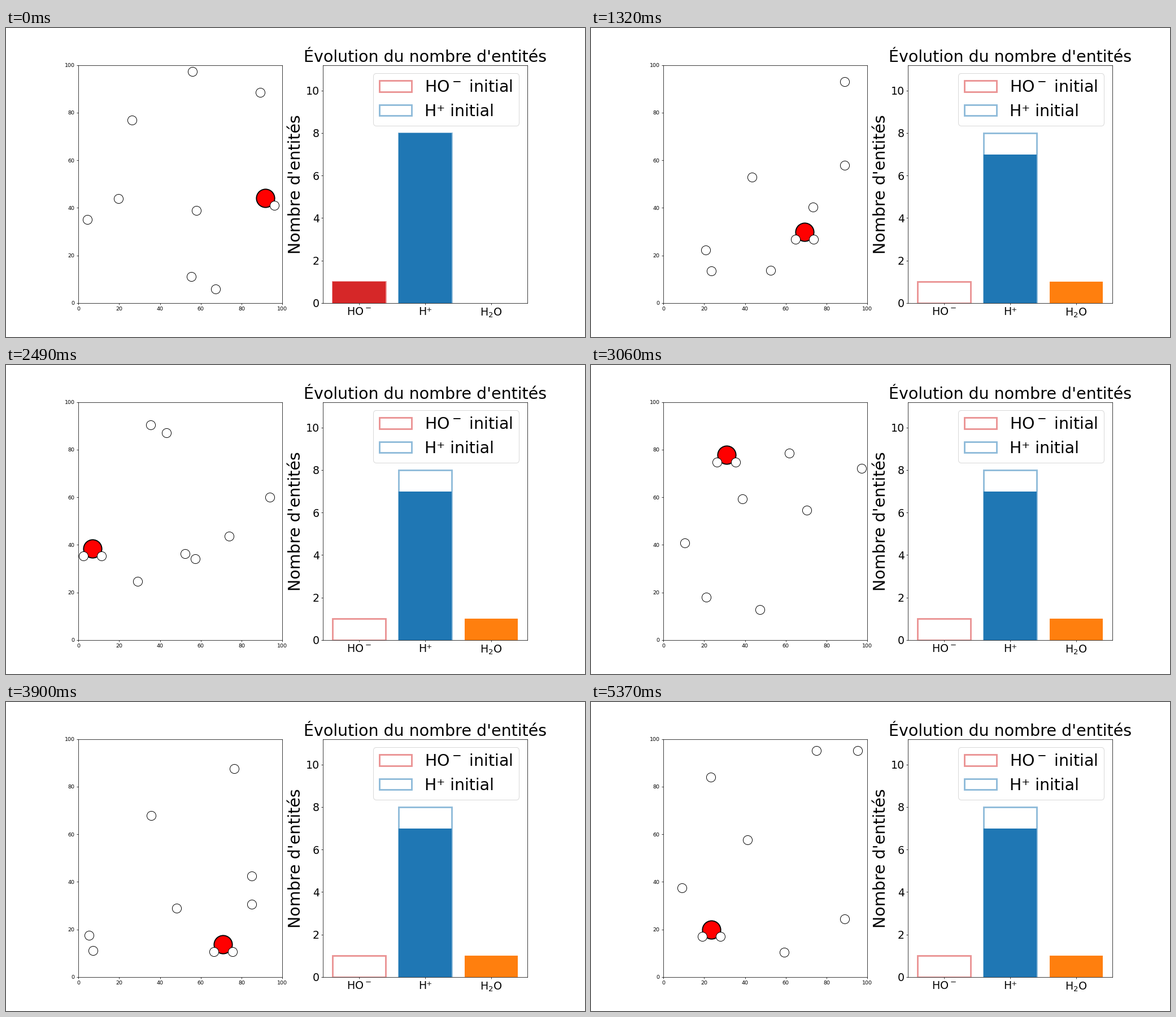
Write a matplotlib script that moves like this. It is 1025x547 px and loops after 5.4 s.

```python
import itertools

import numpy as np
import matplotlib.pyplot as plt
from matplotlib.animation import FuncAnimation

plt.rcParams["font.family"] = "DejaVu Sans"

W, H, DPI = 1025, 547, 1025 / 15
STEPS, CYCLES, INTERVAL = 90, 2, 30
SPEED = 4          # axis units per step
REACTION = 8       # step at which the water molecule forms
KEY_STEPS = [0, 12, 26, 40, 62, 89]
BOND = np.array([4.5, -3])

# Way-points of the free protons, the reacting proton and the oxygen atom.
PROTONS = [
    [(56.0, 97.4), (97.3, 72.1), (49.7, 43.2), (7.2, 11.0), (96.2, 25.2), (9.0, 37.5)],
    [(89.2, 88.4), (61.7, 78.5), (18.2, 45.5), (85.0, 30.5), (21.0, 84.4), (88.9, 24.5)],
    [(55.3, 11.1), (38.6, 59.3), (86.9, 40.1), (35.6, 67.8), (78.1, 18.6), (23.1, 84.0)],
    [(67.4, 5.8), (70.4, 54.5), (26.4, 50.1), (85.0, 42.5), (89.0, 67.6), (95.1, 95.1)],
    [(57.8, 38.9), (10.4, 40.8), (82.1, 71.7), (48.2, 29.0), (72.3, 59.4), (74.9, 95.1)],
    [(19.6, 44.0), (21.0, 18.0), (61.6, 46.5), (76.3, 87.6), (49.7, 77.2), (59.3, 10.3)],
    [(4.4, 35.2), (47.2, 12.8), (52.7, 61.1), (5.1, 17.5), (91.2, 43.4), (41.1, 57.7)],
]
REACTANT_START = np.array([26.2, 77.0])
OXYGEN = [(91.5, 44.1), (30.9, 77.8), (41.0, 61.6), (71.0, 13.7), (61.4, 87.2), (23.5, 20.0)]


class BouncingPath:
    """Straight runs between way-points, reflected by the walls."""

    def __init__(self, points, margin):
        self.low, self.span = margin, 100 - 2 * margin
        self.points = np.array(points)
        self.moves = [self.best_move(i) for i in range(len(points) - 1)]

    def best_move(self, i):
        start, end = self.points[i:i + 2]
        length = SPEED * (KEY_STEPS[i + 1] - KEY_STEPS[i])
        moves = [self.mirror(end, np.array(k)) - start
                 for k in itertools.product((0, -1, 1), repeat=2)]
        return min(moves, key=lambda move: abs(np.hypot(*move) - length))

    def mirror(self, point, k):
        r = point - self.low
        return self.low + np.where(k % 2, (k + 1) * self.span - r, k * self.span + r)

    def at(self, step):
        i = min(np.searchsorted(KEY_STEPS, step, side="right") - 1, len(self.moves) - 1)
        t = (step - KEY_STEPS[i]) / (KEY_STEPS[i + 1] - KEY_STEPS[i])
        free = self.points[i] + t * self.moves[i]
        return self.low + self.span - abs(self.span - (free - self.low) % (2 * self.span))


proton_paths = [BouncingPath(points, 2.5) for points in PROTONS]
oxygen_path = BouncingPath(OXYGEN, 5)
meeting_point = oxygen_path.at(REACTION) - [BOND[0], -BOND[1]]

fig, (box, chart) = plt.subplots(
    1, 2, figsize=((W + 0.01) / DPI, (H + 0.01) / DPI), dpi=DPI)

box.set(xlim=(0, 100), ylim=(0, 100))


def atoms(size, color, edge, zorder):
    return box.plot([], [], "o", ms=size, mfc=color, mec="black", mew=edge, zorder=zorder)[0]


free_atoms = atoms(17, "white", 1, 3)
oxygen_atom = atoms(34, "red", 2, 4)
bonded_atoms = atoms(17, "white", 1, 5)

names = ["HO$^-$", "H⁺", "H$_2$O"]
bars = chart.bar(range(3), [1, 8, 0], color=["tab:red", "tab:blue", "tab:orange"])
for x, (count, color) in enumerate([(1, "tab:red"), (8, "tab:blue")]):
    chart.bar(x, count, facecolor="none", edgecolor=(color, 0.5), linewidth=3,
              label=names[x] + " initial")
chart.set(xlim=(-0.54, 2.54), ylim=(0, 11.2))
chart.set_xticks(range(3), names)
chart.tick_params(labelsize=20)
chart.set_title("Évolution du nombre d'entités", fontsize=30)
chart.set_ylabel("Nombre d'entités", fontsize=30)
chart.legend(fontsize=30, loc="upper right")


def update(frame):
    step = frame % STEPS
    reacted = step >= REACTION
    oxygen = oxygen_path.at(step)
    free = [path.at(step) for path in proton_paths]
    bonded = [oxygen + BOND]
    if reacted:
        bonded.append(oxygen + BOND * [-1, 1])
    else:
        free.append(REACTANT_START + (meeting_point - REACTANT_START) * step / REACTION)

    free_atoms.set_data(*np.transpose(free))
    bonded_atoms.set_data(*np.transpose(bonded))
    oxygen_atom.set_data(*oxygen[:, None])
    for bar, count in zip(bars, (0, 7, 1) if reacted else (1, 8, 0)):
        bar.set_height(count)
    return [free_atoms, oxygen_atom, bonded_atoms, *bars]


animation = FuncAnimation(fig, update, frames=STEPS * CYCLES, interval=INTERVAL,
                          repeat=True, repeat_delay=0)
plt.show()
```
